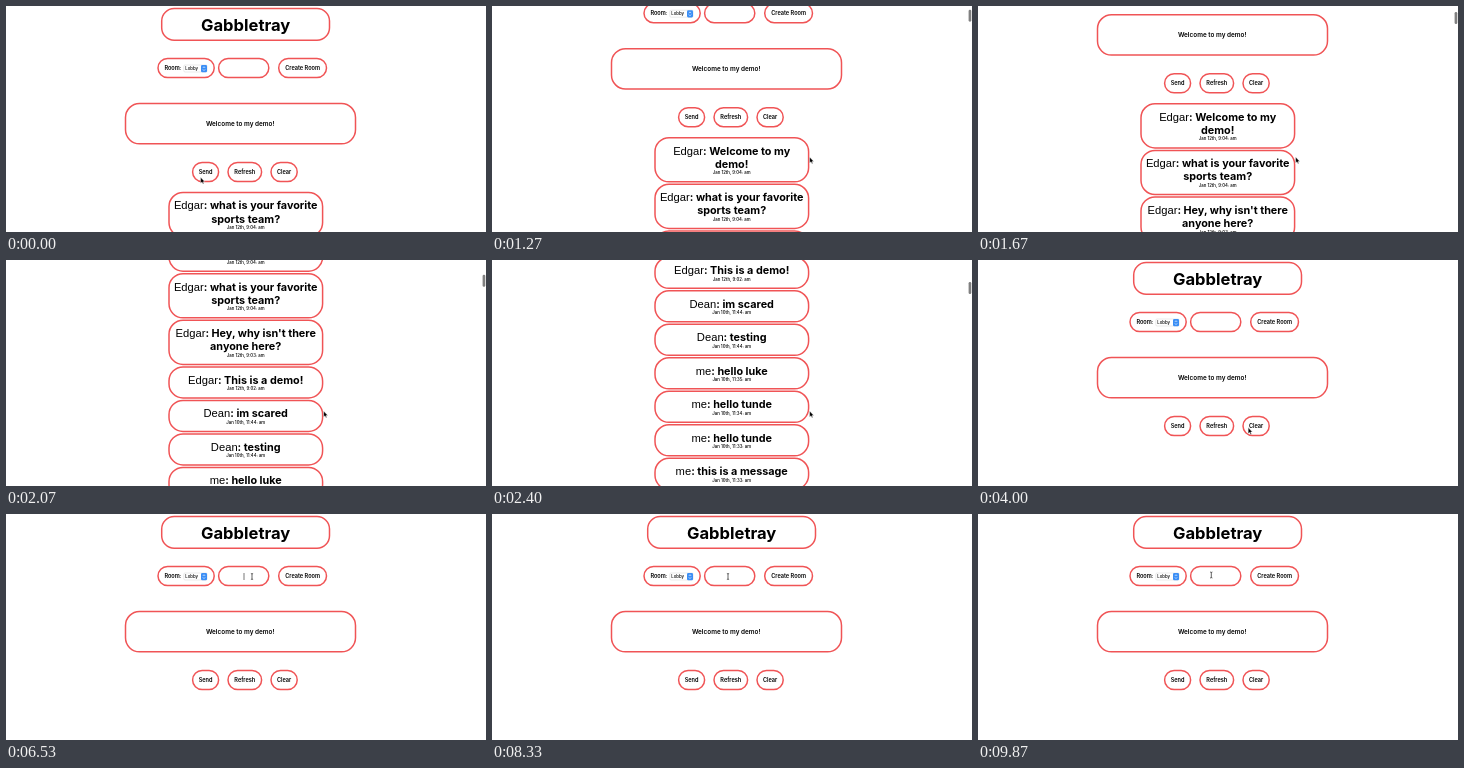
These frames come from a looping animation (480x226 px, 9.94 s). An HTML page:

```html
<!DOCTYPE html>
<html lang="en">
<head>
<meta charset="utf-8">
<title>Chat demo</title>
<style>
  html, body { margin: 0; width: 100%; height: 100%; overflow: hidden; background: #fff; }
  svg { display: block; width: 480px; height: 226px; }
  text { font-family: Inter, "Open Sans", sans-serif; font-weight: 700; text-anchor: middle; }
  .title { font-size: 16.6px; }
  .draft { font-size: 6.4px; font-weight: 600; }
  .label { font-size: 5.6px; font-weight: 600; }
  .msg { font-size: 10.8px; }
  .name { font: 400 11.2px "Liberation Sans", Arial, sans-serif; }
  .date { font-size: 4.3px; font-weight: 500; }
  .box { fill: #fff; stroke: #f05456; stroke-width: 1.5; }
</style>
</head>
<body>
<svg viewBox="0 0 480 226">
  <g id="page">
    <g id="controls"></g>
    <rect x="177.8" y="59" width="23.4" height="7" rx="1.3" fill="#fff" stroke="#ccc" stroke-width=".4"/>
    <text x="185.6" y="64" class="date">Lobby</text>
    <rect x="195" y="59" width="6" height="7.2" rx="1.3" fill="#3b8ef5"/>
    <path d="M196.8 62l1.2-1.3 1.2 1.3m-2.4 1.3l1.2 1.3 1.2-1.3" fill="none" stroke="#fff" stroke-width=".6"/>
    <rect id="caret" x="237.6" y="59" width=".8" height="7" fill="#555"/>
    <g id="list"></g>
  </g>
  <rect id="thumb" x="476.6" width="2.7" height="12" rx="1.3" fill="#808080"/>
  <g id="pointer">
    <path id="arrow" d="M0 0V6L1.4 4.8 2.4 6.8 3.3 6.4 2.4 4.5H4.2Z" stroke="#fff" stroke-width=".4"/>
    <path id="beam" d="M-1.1-3Q0-3 0-2.2Q0-3 1.1-3M0-2.2V2.2M-1.1 3Q0 3 0 2.2Q0 3 1.1 3" fill="none" stroke="#222" stroke-width=".7"/>
  </g>
</svg>
<script>
const LOOP = 9940, TICK = 1000 / 15;
const POST_AT = 650, CLEAR_AT = 3990;
const LIST_TOP = 186.5, LINE = 13.1;

// Author, text, time; "|" breaks the line.
const messages = [
  "Edgar: Welcome to my|demo!; 12th, 9:04",
  "Edgar: what is your favorite|sports team?; 12th, 9:04",
  "Edgar: Hey, why isn't there|anyone here?; 12th, 9:03",
  "Edgar: This is a demo!; 12th, 9:02",
  "Dean: im scared; 10th, 11:44",
  "Dean: testing; 10th, 11:44",
  "me: hello luke; 10th, 11:35",
  "me: hello tunde; 10th, 11:34",
  "me: hello tunde; 10th, 11:33",
  "me: this is a message; 10th, 11:33",
  "me: hello; 10th, 11:33"
];

// Key points: time, then values.
const scrollKeys = [[620, 0], [1670, 89], [2400, 329], [2600, 340], [2930, 286.5], [3750, 0]];
const pointerKeys = [
  [200, 194.6, 171.2], [340, 240, 206], [540, 317.6, 151],
  [3700, 317.6, 151], [3930, 270.2, 167.6],
  [4270, 270.2, 167.6], [6200, 246, 62.5],
  [7900, 246, 62.5], [8070, 236, 62.5],
  [9000, 236, 62.5], [9530, 292, 63],
  [9670, 292, 63], [9860, 233.3, 61]
];

const [page, controls, caret, list, thumb, pointer, arrow, beam] =
  ["page", "controls", "caret", "list", "thumb", "pointer", "arrow", "beam"]
    .map(id => document.getElementById(id));

const box = (x, y, w, h, r) =>
  `<rect class="box" x="${x}" y="${y}" width="${w}" height="${h}" rx="${r}"/>`;
const text = (x, y, cls, content) =>
  `<text x="${x}" y="${y}" class="${cls}">${content}</text>`;
const button = (x, y, w, label) =>
  box(x, y, w, 19, 9.5) + text(x + w / 2, y + 11.5, "label", label);

controls.innerHTML =
  box(155.7, 2.5, 167.8, 31.7, 12.5) + text(239.7, 25, "title", "Gabbletray") +
  box(152, 52.5, 56.2, 19, 9.5) + text(167, 64, "label", "Room:") +
  button(212.6, 52.5, 50.2, "") +
  button(272.7, 52.5, 47.8, "Create Room") +
  box(119.5, 97.5, 230, 40.3, 14) + text(234.2, 119.7, "draft", "Welcome to my demo!") +
  button(186.6, 156.5, 26, "Send") +
  button(222, 156.5, 33.6, "Refresh") +
  button(265, 156.5, 26.2, "Clear");

let nextTop = LIST_TOP;
list.innerHTML = messages.map(message => {
  const [body, date] = message.split("; ");
  const [author, words] = body.split(": ");
  const [first, second = ""] = words.split("|");
  const y = nextTop, extra = second ? LINE : 0;
  nextTop += 33.5 + extra;
  return "<g>" + box(163, y, 153.6, 31 + extra, 14) +
    text(239.7, y + 17, "msg", `<tspan class="name">${author}</tspan>: ${first}`) +
    text(239.7, y + 17 + LINE, "msg", second) +
    text(239.7, y + 23.6 + extra, "date", `Jan ${date}: am`) + "</g>";
}).join("");
const newest = list.firstElementChild;

function sample(keys, t) {
  const i = keys.findIndex(key => key[0] > t);
  const b = keys.at(i), a = keys[Math.max(0, i - 1)];
  if (i <= 0) return b.slice(1);
  const p = (t - a[0]) / (b[0] - a[0]);
  return a.slice(1).map((v, k) => v + (b[k + 1] - v) * p);
}

const show = (node, visible) => node.style.display = visible ? "" : "none";
const move = (node, x, y) => node.setAttribute("transform", `translate(${x} ${y})`);

function draw(t) {
  const [scroll] = sample(scrollKeys, t);
  const [x, y] = sample(pointerKeys, t);
  const posted = t >= POST_AT;

  move(page, 0, -scroll);
  move(list, 0, posted ? 0 : -33.5 - LINE);
  show(newest, posted);
  show(list, t < CLEAR_AT);

  show(thumb, posted && t < 3900);
  thumb.setAttribute("y", Math.max(.5, scroll * .067));

  const overDraft = y > 98 && y < 137;
  const overRoom = x > 213 && x < 263 && y > 53 && y < 71;
  move(pointer, x, y);
  show(arrow, !overDraft && !overRoom);
  show(beam, overDraft || overRoom);
  show(caret, t > 6500 && t < 9800 && t % 1000 > 520 && t % 1000 < 990);
}

const start = performance.now();
function frame() {
  const t = (performance.now() - start) % LOOP;
  draw(Math.floor((t + 5) / TICK) * TICK);
  requestAnimationFrame(frame);
}
draw(0);
requestAnimationFrame(frame);
</script>
</body>
</html>
```
